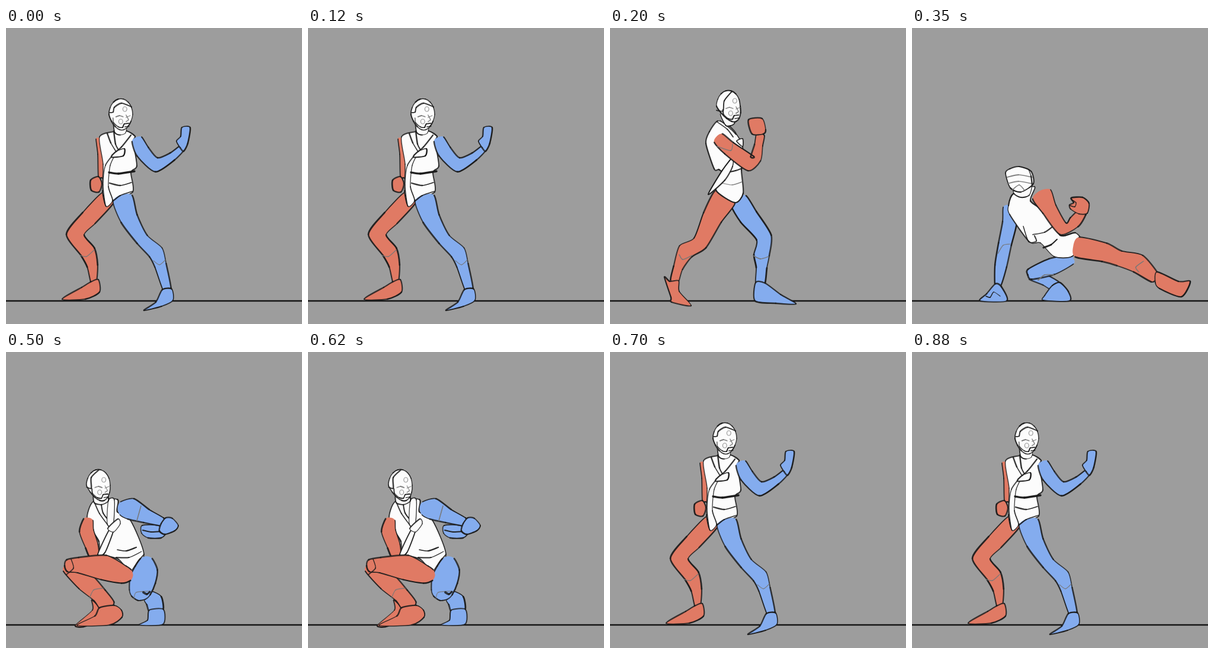
Write an HTML page that moves like this. It is 500x500 px and loops after 1 s.

```html
<!DOCTYPE html>
<html lang="en">
<head>
<meta charset="utf-8">
<title>Sweep kick</title>
<style>
html, body { margin: 0; width: 100%; height: 100%; overflow: hidden; background: #9d9d9d; }
svg { display: block; width: 100vw; height: 100vh; }
</style>
</head>
<body>
<svg id="stage" viewBox="0 0 500 500" fill="none" stroke-linecap="round" stroke-linejoin="round">
  <rect width="500" height="500" fill="#9d9d9d"/>
  <path d="M0 461H500" stroke="#151515" stroke-width="2.6"/>
</svg>
<script>
const NS = 'http://www.w3.org/2000/svg';
const RED = '#e07a64', BLUE = '#84acee', WHITE = '#fcfcfc', INK = '#1c1c1c', SOFT = '#777';
let layer = document.getElementById('stage');
let seed = 7;

const random = () => (seed = seed * 16807 % 2147483647) / 2147483647;
const parse = text => text.split(' ').map(p => p.split(',').map(Number));

function add(tag, attrs) {
  const el = document.createElementNS(NS, tag);
  for (const key in attrs) el.setAttribute(key, attrs[key]);
  layer.append(el);
  return el;
}

// Draws everything that fn adds into a group of its own.
function group(attrs, fn) {
  const outer = layer, g = layer = add('g', attrs);
  fn();
  layer = outer;
  return g;
}

// Curve pieces through the points, each as [start, rest].
function pieces(pts, closed) {
  const n = pts.length, k = 0.13;
  const at = i => closed ? pts[(i + n) % n] : pts[Math.max(0, Math.min(n - 1, i))];
  return Array.from({ length: closed ? n : n - 1 }, (_, i) => {
    const [a, b, c, e] = [at(i - 1), at(i), at(i + 1), at(i + 2)];
    const out = b.map((v, j) => v + (c[j] - a[j]) * k);
    const into = c.map((v, j) => v - (e[j] - b[j]) * k);
    return [b, `C${out} ${into} ${c}`];
  });
}

// Brush strokes whose pressure changes from piece to piece.
function ink(parts, weight, stroke = INK) {
  for (const [from, curve] of parts) {
    add('path', {
      d: `M${from}${curve}`, stroke,
      'stroke-width': weight * (0.75 + 0.6 * random()),
      'stroke-opacity': 0.8 + 0.2 * random()
    });
  }
}

function fillOutline(fill, pts, weight, inked = pts.length) {
  const parts = pieces(pts, true);
  add('path', { d: 'M' + pts[0] + parts.map(p => p[1]).join('') + 'Z', fill });
  ink(parts.slice(0, inked), weight);
}

const shape = (fill, text, weight = 2) => fillOutline(fill, parse(text), weight);
const line = (text, weight = 1.9, stroke) => ink(pieces(parse(text), false), weight, stroke);
const faint = text => line(text, 1.4, SOFT);

// A limb is a bone of "x,y,halfWidth" stations; its root stays without ink.
function limb(fill, text, weight = 2.1) {
  const bone = parse(text), last = bone.length - 1;
  const frame = i => {
    const a = bone[Math.max(0, i - 1)], b = bone[Math.min(last, i + 1)];
    const dx = b[0] - a[0], dy = b[1] - a[1], len = Math.hypot(dx, dy);
    return [dx / len, dy / len];
  };
  const side = sign => bone.map(([x, y, w], i) => {
    const [tx, ty] = frame(i);
    return [x - ty * w * sign, y + tx * w * sign];
  });
  const cap = (i, sign) => {
    const [x, y, w] = bone[i], [tx, ty] = frame(i);
    return [x + tx * w * sign * 0.4, y + ty * w * sign * 0.4];
  };
  const pts = [...side(1), cap(last, 1), ...side(-1).reverse(), cap(0, -1)];
  fillOutline(fill, pts, weight, pts.length - 2);
}

// An egg whose jaw leans towards the side the face is turned to.
function head(x, y, turn, band) {
  group({ transform: `translate(${x} ${y})` }, () => {
    const egg = Array.from({ length: 14 }, (_, i) => {
      const a = i / 14 * Math.PI * 2, low = Math.max(0, Math.sin(a));
      return [20 * Math.cos(a) * (1 - 0.2 * low) + 8 * turn * low, 26.5 * Math.sin(a)];
    });
    fillOutline(WHITE, egg, 1.8);
    line(band, 1.9);
    group({ transform: `translate(${4 * turn - 4} 0)` }, () => {
      line('-10,6 -9,14 -1,21 6,22 9,16 17,15', 1.7);
      for (const [cx, cy] of [[10, -9], [3, 12]]) {
        add('ellipse', { cx, cy, rx: 3.4, ry: 4, stroke: '#999', 'stroke-width': 1.2 });
      }
      faint('-5,4 1,2 7,4');
      faint('12,5 19,2');
      faint('12,1 16,9 12,12');
      line('10,21 17,20', 1.3);
    });
  });
}

function guard() {
  limb(RED, '156,187,4 160,213,5 161,251,5');
  shape(RED, '143,257 156,251 162,263 157,277 144,274');
  limb(RED, '172,287,13 140,321,14 117,349,15 138,378,13 146,402,9 148,428,5');
  shape(RED, '143,429 128,438 95,458 134,458 158,446 156,425');
  faint('125,384 136,386 149,375');
  shape(WHITE, '158,184 183,175 204,174 218,183 215,192 221,233 211,244 214,277 178,292 169,301 163,275 164,230', 1.7);
  limb(BLUE, '197,288,17 208,322,15 230,357,11 253,379,13 261,401,10 272,441,7');
  shape(BLUE, '264,442 253,463 233,477 263,470 282,460 280,441');
  faint('249,393 259,400 269,392');
  line('180,293 193,283 213,276');
  shape(WHITE, '187,208 176,232 173,268 180,291 169,301 164,265 168,232', 1.5);
  line('174,244 190,246 217,242', 2.6);
  line('175,262 193,266 212,261');
  line('171,178 177,194 186,209');
  line('182,174 185,196 190,206');
  line('211,181 195,201 179,215');
  shape(WHITE, '187,208 200,204 198,216 178,218', 1.8);
  limb(BLUE, '221,188,9 231,209,12 254,231,12 281,217,7 297,203,5');
  shape(BLUE, '294,202 288,191 295,183 297,168 311,168 307,195 300,208');
  limb(WHITE, '193,160,11 193,177,9', 1.5);
  head(194, 146, 0.2, '-19,-3 -13,-4 -11,-12 1,-19 18,-13');
}

function step() {
  limb(BLUE, '217,291,15 234,319,16 260,354,13 256,384,13 256,405,9 254,430,8');
  shape(BLUE, '246,430 245,461 280,465 314,466 288,450 262,431');
  faint('243,385 254,390 268,386');
  limb(RED, '194,286,20 173,320,17 152,363,13 128,377,14 115,405,8 109,427,7');
  shape(RED, '101,428 92,421 103,455 104,463 137,469 117,445 116,427');
  faint('117,383 123,391 139,384');
  shape(WHITE, '182,157 168,175 162,195 176,238 184,239 190,247 179,274 211,295 225,279 222,240 224,200 212,177 200,165', 1.8);
  line('202,243 212,241 223,237', 1.6);
  faint('189,262 206,265 223,260');
  line('180,158 198,171 208,184');
  line('186,156 204,171 213,180');
  shape(WHITE, '214,191 224,187 224,200', 1.6);
  shape(WHITE, '207,219 190,240 166,281 194,257 207,234', 1.8);
  limb(RED, '183,186,10 201,203,12 238,229,13 246,221,9 251,198,7 254,181,7');
  shape(RED, '240,179 234,155 257,153 263,172 259,179');
  faint('181,200 204,207 207,196');
  limb(WHITE, '197,142,11 203,162,8', 1.6);
  head(200, 132, 1.2, '6,-25 -7,-9 -9,8 -20,7');
}

function sweep() {
  limb(BLUE, '200,418,7 225,426,9 245,438,9');
  shape(BLUE, '237,435 224,452 222,460 266,461 264,445 250,430');
  limb(BLUE, '270,391,8 236,403,14 199,416,9');
  faint('213,426 224,417 240,417');
  limb(BLUE, '163,302,9 165,328,12 157,365,11 150,402,10 145,435,5');
  shape(BLUE, '141,432 126,449 115,461 160,461 151,437');
  line('125,453 132,455 138,446 149,453', 1.4);
  faint('145,381 154,367 166,365');
  shape(WHITE, '171,280 163,300 165,315 198,361 217,363 240,386 270,386 287,362 276,346 250,350 225,311 200,292 207,268', 1.8);
  line('188,335 197,361 210,360 207,351');
  line('204,349 224,345 238,335');
  line('222,371 235,366 245,357', 2.7);
  limb(RED, '279,370,17 325,379,16 350,389,13 382,398,16 410,422,9');
  shape(RED, '414,412 450,428 470,428 455,454 418,440 411,430');
  faint('383,412 378,404 391,394');
  limb(RED, '219,281,17 232,306,13 255,339,11 274,328,10 288,311,7');
  shape(RED, '268,306 266,299 273,295 269,287 288,286 299,296 296,313 282,314');
  line('270,290 277,295 275,302 267,300', 1.8);
  limb(WHITE, '187,264,15 185,281,13', 1.6);
  shape(WHITE, '158,245 165,238 181,234 201,242 205,263 184,277 166,270', 1.8);
  for (const y of [252, 263]) faint(`161,${y} 180,${y - 4} 203,${y}`);
  faint('170,273 181,265 190,274');
  line('197,239 201,250 203,266');
}

function crouch() {
  limb(BLUE, '240,412,10 250,420,14 254,437,12');
  shape(BLUE, '242,436 239,453 225,461 265,460 266,435');
  shape(WHITE, '148,252 137,284 157,320 160,341 190,350 212,372 233,342 210,284 188,270 188,249', 1.8);
  limb(BLUE, '237,349,10 237,365,19 231,385,22 226,406,18 224,415,12');
  line('212,370 222,355 233,342');
  faint('216,417 220,406 243,404');
  line('232,406 238,409 243,405', 2.8);
  line('188,334 203,336 220,330');
  line('186,347 208,347 229,337', 1.5);
  line('149,253 158,273 174,295');
  line('160,250 164,272 179,291', 1.6);
  limb(RED, '139,283,8 136,302,12 145,328,11 149,345,8');
  shape(WHITE, '173,251 183,250 181,293 171,290', 1.6);
  shape(WHITE, '174,301 155,342 167,339 182,300', 1.6);
  shape(WHITE, '172,298 189,282 193,290 182,304', 1.6);
  shape(RED, '145,419 146,436 117,462 135,463 162,440', 1.7);
  limb(RED, '104,362,11 134,388,16 158,411,13 172,430,13', 1.9);
  shape(RED, '158,432 150,446 120,462 175,461 196,448 195,436 183,428', 1.9);
  faint('141,416 148,402 164,399');
  limb(RED, '211,377,9 199,376,15 165,364,21 122,360,13 103,361,10');
  line('102,376 114,365 110,350', 1.5);
  shape(BLUE, '230,293 258,293 270,305 262,314 240,314 229,306', 1.9);
  line('231,301 245,304 264,303', 1.6);
  limb(BLUE, '193,264,11 211,265,18 237,277,12 264,287,7');
  shape(BLUE, '262,290 270,280 281,281 291,293 285,302 268,308 259,302');
  faint('221,285 228,260');
  limb(WHITE, '159,238,11 161,253,12', 1.6);
  head(156, 225, 0.8, '1,-26 -12,-13 -12,5 -20,3');
}

// Each pose holds from its start time until the next one.
const LOOP = 1000;
const cues = [[0, guard], [200, step], [350, sweep], [500, crouch], [700, guard]];
const poses = new Map([guard, step, sweep, crouch].map(draw => [draw, group({}, draw)]));

function render(time) {
  const now = cues.filter(([start]) => start <= time % LOOP).pop()[1];
  poses.forEach((g, draw) => g.setAttribute('visibility', draw === now ? 'visible' : 'hidden'));
}

const begin = performance.now();
function tick() {
  render(performance.now() - begin);
  requestAnimationFrame(tick);
}
render(0);
requestAnimationFrame(tick);
</script>
</body>
</html>
```
